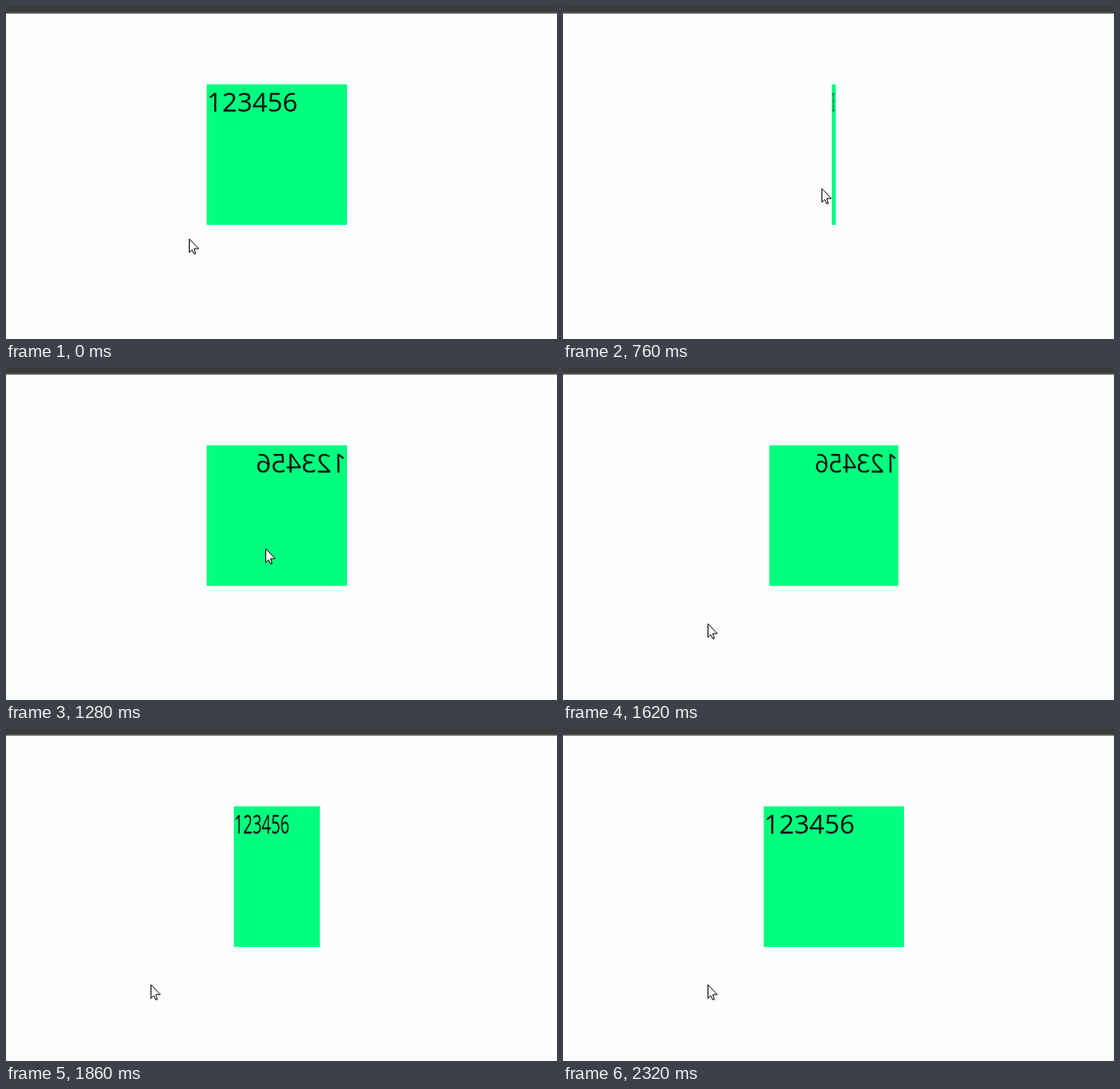
An HTML page for the animation above (3170 ms loop, 648x391 px).

```html
<!DOCTYPE html>
<html lang="en">
<head>
<meta charset="utf-8">
<title>Flip card</title>
<style>
  html, body { margin: 0; width: 100%; height: 100%; overflow: hidden; background: #fefefe; }
  #stage { position: relative; width: 648px; height: 391px; overflow: hidden; }
  #bar { height: 7px; background: #3c3b3c; border-bottom: 2px solid #5b5a5b; }
  #card {
    position: absolute; left: 236px; top: 92px; width: 165px; height: 165px;
    background: #00ff7f; color: #0a0a0a; text-indent: .5px;
    font: 31px/40px "Open Sans", "Noto Sans", sans-serif;
  }
  #cursor { position: absolute; left: 0; top: 0; }
</style>
</head>
<body>
<div id="stage">
  <div id="bar"></div>
  <div id="card">123456</div>
  <svg id="cursor" width="14" height="20">
    <path d="M.5 .5V16.5L3.8 13.3L6 18H8L6.2 12H11.5Z" fill="#fff" stroke="#000"/>
  </svg>
</div>
<script>
const LOOP = 3170;
const card = document.getElementById('card');
const cursor = document.getElementById('cursor');

const clamp = v => Math.min(1, Math.max(0, v));
const span = (t, from, to) => clamp((t - from) / (to - from));
const mix = (a, b, k) => a + (b - a) * k;
const smooth = k => k * k * (3 - 2 * k);
const bezier = (a, b, s) => 3 * a * s * (1 - s) ** 2 + 3 * b * s * s * (1 - s) + s ** 3;

// CSS "ease", solved by bisection
function ease(x) {
  if (x === 0 || x === 1) return x;
  let lo = 0, hi = 1;
  for (let i = 0; i < 24; i++) {
    const mid = (lo + hi) / 2;
    if (bezier(.25, .25, mid) < x) lo = mid; else hi = mid;
  }
  return bezier(.1, 1, lo);
}

// The pointer curves onto the card, rests, then leaves to the lower left.
function pointer(t) {
  const enter = span(t, 340, 785);
  const leave = smooth(span(t, 1440, 1620));
  const x = mix(215, 305, 1 - (1 - enter) ** 1.5);
  const y = mix(273, 213, smooth(enter));
  return [mix(x, 170, leave), mix(y, 301, leave)].map(Math.round);
}

// Hovering turns the card over; leaving turns it back.
const turn = t => ease(span(t, 555, 1268)) - ease(span(t, 1525, 2325));

function draw(t) {
  const [x, y] = pointer(t);
  card.style.transform = `scaleX(${Math.cos(Math.PI * turn(t)).toFixed(5)})`;
  cursor.style.transform = `translate(${x}px, ${y}px)`;
}

const start = performance.now();
function tick() {
  draw((performance.now() - start) % LOOP);
  requestAnimationFrame(tick);
}
tick();
</script>
</body>
</html>
```
